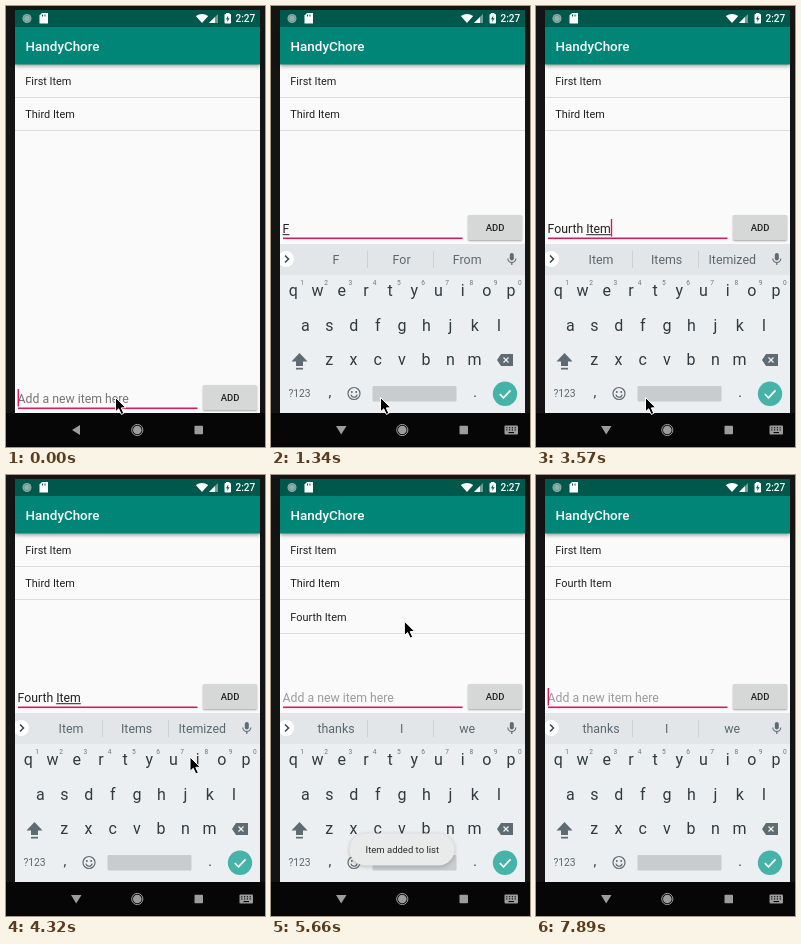
Write an HTML page with a canvas that moves like this. It is 259x441 px and loops after 8000 ms.

```html
<!DOCTYPE html>
<html lang="en">
<head>
<meta charset="utf-8">
<title>Task list</title>
<style>
html, body { margin: 0; width: 100%; height: 100%; overflow: hidden; background: #141414; }
canvas { display: block; width: 259px; height: 441px; }
</style>
</head>
<body>
<canvas id="stage" width="259" height="441"></canvas>
<script>
const LOOP = 8000, TICK = 148.9;
const LEFT = 9, RIGHT = 254, KEYS_TOP = 238, NAV_TOP = 407;
const PINK = '#d81b60', ICON = '#5f6b73';
const stage = document.getElementById('stage').getContext('2d');
const layer = document.createElement('canvas');
layer.width = 259;
layer.height = NAV_TOP - KEYS_TOP;
const keys = layer.getContext('2d');
let c = stage;

// Each entry holds from its tick until the next one.
const typed = [[0, ''], [6, 'F'], [11, 'Fo'], [13, 'Fou'], [14, 'Four'], [15, 'Fourth'], [16, 'Fourth '],
  [19, 'Fourth I'], [22, 'Fourth It'], [24, 'Fourth Item'], [33, '']];
const hints = [[0, 'thanks I we'], [6, 'F For From'], [11, 'Fo For Food'], [13, 'Fou Four Found'],
  [14, 'Fourt Fourth Court'], [16, 'of July in'], [19, 'I Is In'], [22, "It Its It's"],
  [24, 'Item Items Itemized'], [34, 'thanks I we']];
const caret = [[0, 1], [3, 0], [6, 1], [9, 0], [11, 1], [28, 0], [31, 1], [37, 0], [40, 1], [43, 0],
  [47, 1], [50, 0], [53, 1]];
const toast = [[0, 0], [35, .5], [36, 1], [52, .4], [53, 0]];
const slide = [[3, [30, .3]], [4, [8.5, .75]], [5, [0, 1]]];
const pointer = [[0, 109, 391], [26, 109, 391], [31, 224, 222], [34, 224, 222], [40, 101, 119],
  [41, 101, 111], [48, 101, 111], [51, 110, 394]];

const at = (list, k) => list.filter(e => e[0] <= k).pop()[1];

function rect(x, y, w, h, color) {
  c.fillStyle = color;
  c.fillRect(x, y, w, h);
}

function round(x, y, w, h, r, color) {
  c.fillStyle = color;
  c.beginPath();
  c.roundRect(x, y, w, h, r);
  c.fill();
}

function disc(x, y, r, color) {
  c.fillStyle = color;
  c.beginPath();
  c.arc(x, y, r, 0, 7);
  c.fill();
}

function ring(x, y, r, color, width) {
  c.strokeStyle = color;
  c.lineWidth = width;
  c.beginPath();
  c.arc(x, y, r, 0, 7);
  c.stroke();
}

function poly(points, color) {
  c.fillStyle = color;
  c.beginPath();
  points.forEach(p => c.lineTo(...p));
  c.closePath();
  c.fill();
}

function line(points, color, width) {
  c.strokeStyle = color;
  c.lineWidth = width;
  c.beginPath();
  points.forEach(p => c.lineTo(...p));
  c.stroke();
}

function text(s, x, y, size, color, align = 'left', weight = 400) {
  c.font = `${weight} ${size}px Roboto, sans-serif`;
  c.textAlign = align;
  c.fillStyle = color;
  c.fillText(s, x, y);
}

function shadow(color, blur, dy) {
  c.shadowColor = color;
  c.shadowBlur = blur;
  c.shadowOffsetY = dy;
}

const noShadow = () => shadow('transparent', 0, 0);

function drawStatusBar() {
  rect(LEFT, 4, RIGHT - LEFT, 17, '#00574b');
  disc(21, 12.5, 4.5, '#8fb0ab');
  ring(21, 12.5, 3.2, '#6d9690', 1);
  poly([[36, 7], [42, 7], [42, 17.5], [33.5, 17.5], [33.5, 9.5]], '#fff');
  rect(36, 8.5, 1, 2, '#00574b');
  rect(38.5, 8.5, 1, 2, '#00574b');
  c.fillStyle = '#fff';
  c.beginPath();
  c.moveTo(196, 17);
  c.lineTo(189.8, 10);
  c.quadraticCurveTo(196, 5.8, 202.2, 10);
  c.fill();
  poly([[203, 17], [212, 17], [212, 8]], '#6f9d96');
  poly([[203, 17], [209, 17], [209, 11]], '#fff');
  rect(220, 7, 3.5, 2, '#fff');
  round(218.5, 8, 6.5, 9.5, 1, '#fff');
  poly([[222.3, 9.5], [220, 13.2], [221.5, 13.2], [221.2, 16], [223.6, 12.2], [222, 12.2]], '#00574b');
  text('2:27', 229.5, 16.2, 10, '#fff', 'left', 500);
}

function drawAppBar() {
  shadow('rgba(0,0,0,.4)', 4, 1);
  rect(LEFT, 20, RIGHT - LEFT, 38.5, '#008577');
  noShadow();
  text('HandyChore', 19.6, 44.5, 13.4, '#fff', 'left', 500);
}

function drawList(k) {
  const items = ['First Item'];
  if (k < 48) items.push('Third Item');
  if (k >= 33) items.push('Fourth Item');
  items.forEach((item, i) => {
    const y = 58.5 + 33.3 * i;
    if (i === 1 && k >= 45 && k < 48) rect(LEFT, y, RIGHT - LEFT, 33.3, '#eeeeee');
    text(item, 19.3, y + 20.6, 10.9, '#212121');
    rect(LEFT, Math.round(y + 32.5), RIGHT - LEFT, 1, '#dcdcdc');
  });
}

function drawInput(k) {
  const base = k < 3 ? 397 : 227, value = at(typed, k), x = 11.6;
  text(value || 'Add a new item here', x, base, 12.25, value ? '#212121' : k < 1 ? '#757575' : '#9c9c9c');
  const width = c.measureText(value).width;
  const word = value.split(' ').pop();
  if (word) {
    const w = c.measureText(word).width;
    rect(x + width - w, base + 1.2, w, 1, '#212121');
  }
  rect(12, base + 4.5, 179.5, 1.6, PINK);
  if (at(caret, k)) rect(x + width, base - 14, 1.4, 17.5, PINK);

  const pressed = k >= 32 && k < 36;
  shadow('rgba(0,0,0,.35)', pressed ? 4 : 2, 1);
  round(197, base - 18, 54, 25, 1.5, pressed ? '#bfc0c0' : '#d6d7d7');
  noShadow();
  text('ADD', 224, base - 1.8, 9.5, '#212121', 'center', 500);
}

function drawSuggestions(words) {
  rect(LEFT, 238, RIGHT - LEFT, 31, '#e2e6e9');
  words.split(' ').forEach((w, i) => text(w, 65 + 65.6 * i, 257.5, 12.4, '#5c686f', 'center'));
  [96, 162].forEach(x => rect(x, 245, 1, 17, '#cbd1d4'));
  c.save();
  c.beginPath();
  c.rect(LEFT, 240, 30, 28);
  c.clip();
  disc(15, 253, 8, '#fff');
  c.restore();
  line([[14, 249.5], [17.5, 253], [14, 256.5]], '#37474f', 1.5);
  round(238.8, 247, 4, 7.5, 2, ICON);
  c.strokeStyle = ICON;
  c.lineWidth = 1.1;
  c.beginPath();
  c.arc(240.8, 252.5, 4, 0, Math.PI);
  c.stroke();
  rect(240.2, 256.5, 1.2, 2.5, ICON);
}

function drawKeys() {
  const step = 24.2;
  [['qwertyuiop', 22.3, 290], ['asdfghjkl', 34.3, 324.5], ['zxcvbnm', 58.3, 359]].forEach(([row, x, y]) =>
    [...row].forEach((ch, i) => text(ch, x + step * i, y, 16, '#2f3b41', 'center')));
  [...'1234567890'].forEach((n, i) => text(n, 31 + step * i, 278.5, 6.6, '#6b777d', 'center'));

  poly([[28.5, 347], [36.5, 355.5], [32, 355.5], [32, 360], [25, 360], [25, 355.5], [20.5, 355.5]], ICON);
  rect(25, 361.8, 7, 1.7, ICON);
  poly([[226, 354], [230, 348], [242, 348], [242, 360], [230, 360]], ICON);
  line([[232.5, 351.5], [237.5, 356.5]], '#eceff1', 1.3);
  line([[237.5, 351.5], [232.5, 356.5]], '#eceff1', 1.3);

  text('?123', 28.5, 391, 10.3, '#5c686f', 'center');
  text(',', 59, 391, 14, '#2f3b41', 'center');
  text('.', 204, 391, 14, '#2f3b41', 'center');
  ring(83, 387.5, 6, ICON, 1.2);
  disc(80.8, 386, 1, ICON);
  disc(85.2, 386, 1, ICON);
  c.beginPath();
  c.arc(83, 388, 3.2, .2, Math.PI - .2);
  c.stroke();
  round(101.5, 380, 84, 15.5, 1, '#c8ccce');
  disc(234, 387.8, 12.2, '#45b3a8');
  line([[228.8, 388], [232.5, 391.8], [239.5, 384.3]], '#fff', 1.7);
}

function drawKeyboard(k) {
  const [offset, alpha] = at(slide, k);
  c = keys;
  c.setTransform(1, 0, 0, 1, 0, -KEYS_TOP);
  c.clearRect(0, KEYS_TOP, 259, layer.height);
  rect(LEFT, KEYS_TOP, RIGHT - LEFT, layer.height, '#eceff1');
  drawSuggestions(at(hints, k));
  drawKeys();
  c = stage;
  c.globalAlpha = alpha;
  c.drawImage(layer, 0, KEYS_TOP + offset);
  c.globalAlpha = 1;
}

function drawNav(open) {
  const gray = '#9c9c9c';
  rect(0, NAV_TOP, 259, 34, '#060606');
  poly(open ? [[65, 420], [75.5, 420], [70.2, 428.5]] : [[74, 419], [74, 429], [66, 424]], gray);
  disc(131.3, 424, 4.3, gray);
  ring(131.3, 424, 5.6, gray, 1);
  round(188.5, 419.8, 8.5, 8.5, .8, gray);
  if (!open) return;
  round(233.5, 419.5, 13.5, 9, 1, gray);
  for (let i = 0; i < 8; i++) rect(235.2 + i % 4 * 2.8, 421.2 + (i >> 2) * 2.2, 1.2, 1.1, '#060606');
  rect(237.5, 426, 5.5, 1.1, '#060606');
}

function drawToast(alpha) {
  if (!alpha) return;
  c.globalAlpha = alpha;
  shadow('rgba(0,0,0,.22)', 4, 1);
  round(78.5, 358.5, 105, 32, 16, '#e9eaea');
  noShadow();
  text('Item added to list', 131.3, 378, 9.5, '#2b2b2b', 'center');
  c.globalAlpha = 1;
}

function pointerAt(k) {
  const i = pointer.findLastIndex(p => p[0] <= k);
  const [k0, x0, y0] = pointer[i];
  const [k1, x1, y1] = pointer[i + 1] || [k0 + 1, x0, y0];
  const u = (k - k0) / (k1 - k0), e = u * u * (3 - 2 * u);
  return [x0 + (x1 - x0) * e, y0 + (y1 - y0) * e];
}

function drawPointer(k) {
  if (k >= 52) return;
  c.save();
  c.translate(...pointerAt(k));
  const shape = [[.5, .5], [.5, 14.8], [3.7, 11.8], [6.3, 17.4], [8.8, 16.3], [6.3, 10.9], [10.8, 10.7]];
  poly(shape, '#000');
  c.lineJoin = 'round';
  line([...shape, shape[0]], '#fff', 1);
  c.restore();
}

function draw(t) {
  const k = Math.floor((t + 10) / TICK), open = k >= 3;
  rect(0, 0, 259, 441, '#141414');
  rect(LEFT, 20, RIGHT - LEFT, NAV_TOP - 20, '#fafafa');
  drawList(k);
  drawAppBar();
  drawStatusBar();
  drawInput(k);
  drawNav(open);
  if (open) drawKeyboard(k);
  drawToast(at(toast, k));
  drawPointer(k);
}

function loop() {
  draw(performance.now() % LOOP);
  requestAnimationFrame(loop);
}
loop();
</script>
</body>
</html>
```
